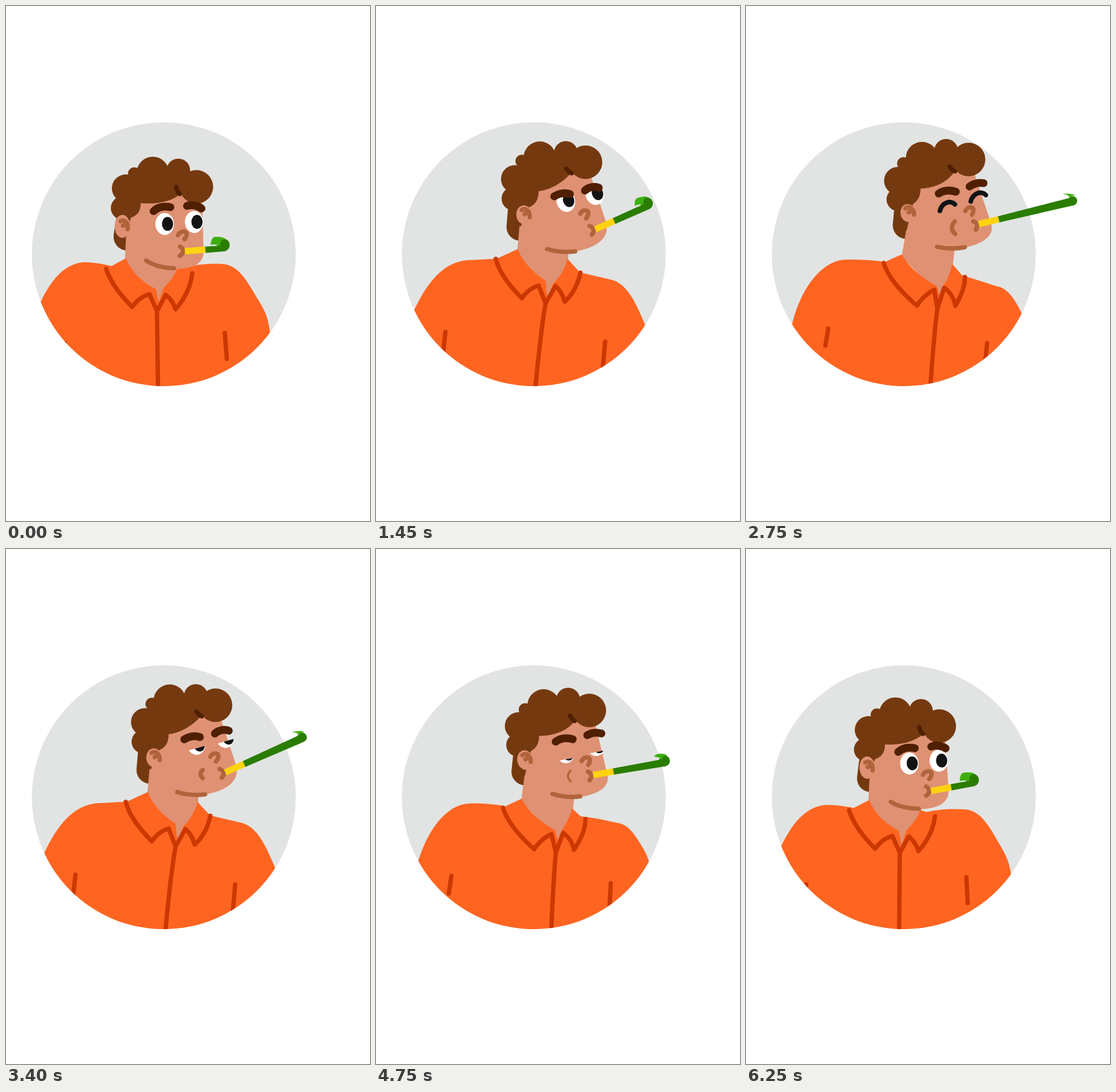
Recreate the animation shown at these times as an HTML page. Size 629 px wide and 890 px high, loop 6300 ms.

```html
<!DOCTYPE html>
<html lang="en">
<head>
<meta charset="utf-8">
<title>Party horn</title>
<style>
  html, body { margin: 0; width: 100%; height: 100%; overflow: hidden; background: #fff; }
  svg { display: block; width: 100vw; height: 100vh; }
  .line { fill: none; stroke-linecap: round; stroke-linejoin: round; stroke-width: 7.5; }
  .skin { fill: #df9173; }
  .hair { fill: #75390f; }
  .nape { stroke: #75390f; stroke-width: 47; }
  .seam { stroke: #cc3800; }
  .crease { stroke: #b0643b; }
  .brow { stroke: #4f1f00; stroke-width: 13.5; }
  .lash { stroke: #121418; stroke-width: 8; }
</style>
</head>
<body>
<svg viewBox="0 0 629 890">
  <defs>
    <clipPath id="disc"><circle cx="272.7" cy="429" r="228"/></clipPath>
    <clipPath id="lid"><rect id="lidRect" x="-30" width="60" height="60"/></clipPath>
    <g id="ball">
      <ellipse rx="16" ry="19" fill="#fff"/>
      <ellipse id="pupil" cx="5" rx="9.7" ry="12" fill="#121414"/>
    </g>
  </defs>
  <circle cx="272.7" cy="429" r="228" fill="#e1e4e3"/>
  <path id="nape" class="line nape"/>
  <path id="neck" class="skin"/>
  <g clip-path="url(#disc)">
    <path id="shirt" fill="#ff6521"/>
    <path id="collar" class="line seam"/>
    <path id="placket" class="line seam"/>
    <path id="sleeves" class="line seam"/>
  </g>
  <path id="face" class="skin"/>
  <path id="hairFill" class="hair"/>
  <g id="curls" class="hair"></g>
  <path id="parting" class="line" stroke="#4f1f00"/>
  <g id="ear">
    <ellipse id="lobe" class="skin" rx="13.5"/>
    <path class="line crease" d="M-3-9C5-13 11-4 9 5M1-1L6-3"/>
  </g>
  <g id="eyeL"></g>
  <g id="eyeR"></g>
  <path id="brows" class="line brow"/>
  <path id="nose" class="line crease"/>
  <path id="mouth" class="line crease"/>
  <path id="cheek" class="line crease"/>
  <path id="jaw" class="line crease"/>
  <g id="horn">
    <path id="paper" fill="#2a7d00"/>
    <circle id="roll" fill="#2a7d00"/>
    <path id="flap" fill="#3fae10"/>
    <rect y="-5.5" width="35.5" height="11" fill="#ffd310"/>
  </g>
</svg>
<script>
const $ = id => document.getElementById(id);

// Each part in four poses: rest, leaning, blowing, easing back.
const paths = {
  nape: [
    "M207 400L210 378",
    "M297 373L300 340",
    "M277 379L280 346",
    "M249 382L252 346"],
  neck: [
    "M205 400L203 445L262 514L289 480L296 455L300 420Z",
    "M297 385L288 430L355 497L372 474L375 445L380 400Z",
    "M284 385L277 428L341 499L358 474L363 442L365 405Z",
    "M248 380L244 425L296 506L324 474L332 438L333 410Z"],
  shirt: [
    "M40 700L40 560C62 495 90 443 137 443C155 444 168 447 181 450L205 437C216 464 237 480 257 490L262 513L270 488C283 475 290 464 294 455L302 453C330 444 352 444 370 444C402 444 417 478 440 515C453 538 456 555 456 590L456 700Z",
    "M86 700L86 580C86 520 130 438 183 437C210 436 235 437 257 440L288 427C302 452 330 471 350 482L355 496L362 482C368 468 373 455 374 443L394 469C415 480 435 489 453 496C465 500 475 512 480 522C490 540 495 560 495 600L495 700Z",
    "M76 700L76 580C80 520 122 438 175 438C200 437 222 437 244 439L277 424C290 450 317 467 335 479L340 498L350 480C356 466 361 453 362 441L385 466C410 478 432 486 446 493C460 499 470 517 476 531C484 550 490 570 490 600L490 700Z",
    "M40 700L40 590C72 500 105 439 165 439C185 438 195 437 208 437L245 420C255 446 276 463 293 475L296 505L306 480C320 466 328 450 331 437L352 460C375 466 395 470 410 474C435 482 450 515 465 551C470 565 475 590 475 610L475 700Z"],
  collar: [
    "M171 455C180 483 200 505 216 521C225 508 235 502 246 499L259 528L274 500C283 507 288 515 291 525C308 505 318 485 320 462",
    "M257 441C266 470 295 498 318 517C327 503 337 494 348 488L351 522L362 483C372 490 380 503 382 516C390 500 396 485 395 470",
    "M244 439C254 466 280 495 300 513C309 500 318 491 330 485L335 518L350 482C358 489 365 501 367 514C377 500 384 485 384 467",
    "M207 437C213 462 235 488 252 505C260 494 270 486 281 483L293 514L310 484C318 490 323 500 326 511C340 498 349 482 353 461"],
  placket: [
    "M259 528C260 570 261 615 262 665",
    "M351 522C343 570 339 615 334 665",
    "M335 518C326 570 321 615 315 665",
    "M293 514C285 560 280 610 275 665"],
  sleeves: [
    "M377 564L381 609M100 584L96 618",
    "M428 588L421 630M154 550L149 578",
    "M418 586L411 628M144 553L139 582",
    "M396 580L392 625M120 563L116 600"],
  face: [
    "M222 330L206 395L205 437C230 448 262 457 293 456C325 455 339 445 338 425L337 325L280 310Z",
    "M315 315L297 390L288 428C320 415 370 412 405 406C440 396 455 380 448 362L408 270L360 275Z",
    "M300 315L283 390L277 425C305 415 355 412 390 406C425 396 444 378 436 358L386 265L340 275Z",
    "M270 325L249 385L245 420C270 422 310 427 345 424C380 418 404 402 398 375L370 290L320 290Z"],
  parting: [
    "M292 315C293 321 295 325 298 327",
    "M369 267C372 270 375 273 379 274",
    "M349 266C352 269 355 271 359 272",
    "M329 281C332 285 334 288 338 289"],
  brows: [
    "M252 356C260 348 270 347 281 349M310 347C320 344 328 347 335 352",
    "M356 315C365 310 375 309 386 313M408 302C414 296 423 293 432 293",
    "M341 313C350 309 361 308 371 311M393 300C399 292 408 289 416 289",
    "M308 329C316 324 326 322 335 325M361 319C367 313 377 311 385 314"],
  nose: [
    "M294 398C298 390 309 390 309 396C309 401 307 403 305 405",
    "M403 342C407 333 417 334 417 340C417 344 416 346 415 348",
    "M390 339C394 330 403 330 404 336C404 340 403 342 402 344",
    "M353 359C357 351 367 352 367 358C367 363 365 365 363 367"],
  mouth: [
    "M297 418C303 421 304 430 296 434",
    "M420 359C427 361 429 366 426 373",
    "M410 353C417 354 421 359 418 366",
    "M369 380C377 383 378 390 373 395"],
  cheek: [
    "M272 412C267 415 267 418 272 421",
    "M386 361C378 370 380 380 387 386",
    "M371 356C364 366 367 379 374 386",
    "M340 382C335 386 335 392 340 396"],
  jaw: [
    "M239 441C252 451 270 454 287 455",
    "M356 409C375 411 392 410 404 406",
    "M342 411C360 412 375 410 390 406",
    "M296 420C312 425 328 426 344 424"],
  // curl centres, then the hairline from parting to sideburn
  hairFill: [
    "M199 350L205 316L220 291L252 290L296 286L327 315L298 328C285 338 262 345 230 342C230 360 220 366 203 370Z",
    "M281 330L279 298L287 267L319 255L360 240L401 251L377 276C365 295 345 306 322 308C322 325 315 335 300 340Z",
    "M261 335L260 302L267 270L296 257L339 241L379 248L357 273C345 295 325 307 307 310C308 327 300 336 286 342Z",
    "M237 333L240 299L252 268L283 262L328 254L362 270L336 290C322 305 302 318 281 320C281 340 272 346 254 352Z"]
};
const spots = {
  ear: ["198 382 0 20", "304 351 -18 14.5", "291 353 -20 15", "256 361 -8 16.5"],
  eyeL: ["271 379 0", "370 330 -20", "357 328 -22", "328 337 -16"],
  eyeR: ["322 376 0", "424 310 -20", "408 306 -22", "378 325 -16"],
  horn: ["305 426 0", "430 363 -17.5", "421 356 -32.5", "379 386 -24"],
  // loose sliver and full curl, measured from the horn's tip
  flap: [
    "M-22 -17C-18 -16 -12 -15 -8 -13C-5 -12 -3 -11 -1 -8C-5 -10 -9 -10 -10 -7L-12 -8C-12 -12 -17 -15 -22 -17Z",
    "M-33 -8C-31 -16 -29 -22 -22 -21C-16 -20 -10 -20 -5 -15C-12 -17 -17 -12 -16 -6L-20 -5C-22 -8 -27 -8 -33 -8Z"]
};
const curlR = [20, 24, 11, 28, 20.5, 29];

const number = /-?\d+(\.\d+)?/g;
const parsed = {};
for (const group of [paths, spots])
  for (const key in group)
    parsed[key] = group[key].map(s => s.match(number).map(Number));

const blend = (key, w) => parsed[key][0].map((_, i) =>
  parsed[key].reduce((sum, pose, p) => sum + pose[i] * w[p], 0));

function fill(template, values) {
  let i = 0;
  return template.replace(number, () => values[i++].toFixed(2));
}

function set(id, attrs) {
  const el = $(id);
  for (const name in attrs) el.setAttribute(name, attrs[name]);
}

$("curls").innerHTML = curlR.map((r, i) => `<circle id="curl${i}" r="${r}"/>`).join("");
for (const id of ["eyeL", "eyeR"]) {
  $(id).innerHTML = `<g id="${id}Open"><g clip-path="url(#lid)"><use href="#ball"/></g></g>
    <path id="${id}Shut" class="line lash" d="M-13 13C-9-2 6-6 13 2"/>`;
}

const clamp = x => Math.max(0, Math.min(1, x));
const smooth = x => x * x * (3 - 2 * x);

const REST = [1, 0, 0, 0], LEAN = [0, 1, 0, 0], PEAK = [0, 0, 1.35, -.35], BACK = [0, 0, 0, 1];
const moves = [
  [250, 850, REST, LEAN, x => .7 * smooth(x) + .3 * Math.sin(x * Math.PI / 2)],
  [850, 1000, LEAN, PEAK, x => 1 - (1 - x) ** 2],
  [1000, 1300, PEAK, BACK, smooth],
  [1800, 2150, BACK, REST, smooth]
];
function weights(t) {
  let w = REST;
  for (const [from, to, a, b, ease] of moves) {
    if (t < from) break;
    const s = ease(clamp((t - from) / (to - from)));
    w = a.map((v, i) => v + (b[i] - v) * s);
  }
  return w;
}

// Tracks of [time, value] with straight lines between.
const tracks = {
  reach: [[300, 41], [500, 80], [650, 140], [850, 168], [1000, 205], [1100, 184], [1150, 161],
    [1300, 119], [1450, 75], [1650, 60], [1800, 57], [2050, 50], [2100, 43], [2150, 41]],
  curl: [[350, 1], [500, .85], [650, .5], [850, .35], [950, 0], [1100, 0], [1300, .55], [1480, 1]],
  lift: [[1800, 0], [2050, 5.5], [2150, 0]],
  lid: [[350, 0], [600, 1], [1200, 1], [1300, .68], [1450, 0]],
  puff: [[480, 0], [620, 1], [1320, 1], [1420, 0]]
};
function track(name, t) {
  const keys = tracks[name], n = keys.findIndex(k => k[0] >= t);
  if (n < 0) return keys[keys.length - 1][1];
  if (n === 0) return keys[0][1];
  const [t0, v0] = keys[n - 1], [t1, v1] = keys[n];
  return v0 + (v1 - v0) * (t - t0) / (t1 - t0);
}

function drawHorn(t, w) {
  const [x, y, turn] = blend("horn", w);
  const curl = track("curl", t), reach = track("reach", t), end = 35 + reach;
  const half = 5 + 2 * clamp((reach - 41) / 80);
  const r = Math.max(half, 5 + 6 * curl), cx = end - r;
  const flare = 1.5 * clamp(1 - curl * 6);
  const stop = flare ? end : cx, neck = stop - 12 * clamp(flare);
  set("horn", { transform: `translate(${x} ${y}) rotate(${turn - track("lift", t)})` });
  set("roll", { cx, cy: half - r, r: flare ? 0 : r });
  set("paper", { d: `M35-5.5L${neck} ${-half}L${stop} ${-half - flare}L${stop} ${half + flare}L${neck} ${half}L35 5.5Z` });

  const thick = clamp((curl - .55) / .45);
  set("flap", {
    d: fill(spots.flap[0], blend("flap", [1 - thick, thick])),
    transform: `translate(${end} 0) scale(${clamp(curl / .3)})`
  });
}

function draw(ms) {
  let t = Math.floor(ms / 50) * 50 % 2100;
  if (t < 50) t += 2100;
  const w = weights(t);

  for (const key in paths) set(key, { d: fill(paths[key][0], blend(key, w)) });
  const hair = blend("hairFill", w);
  curlR.forEach((_, n) => set("curl" + n, { cx: hair[2 * n], cy: hair[2 * n + 1] }));

  const [ex, ey, tilt, ry] = blend("ear", w);
  set("ear", { transform: `translate(${ex} ${ey}) rotate(${tilt})` });
  set("lobe", { ry });

  const lid = track("lid", t), shut = lid >= 1;
  set("lidRect", { y: -20 + 40 * lid });
  set("pupil", { cy: 4 * lid });
  for (const id of ["eyeL", "eyeR"]) {
    const [x, y, turn] = blend(id, w);
    set(id, { transform: `translate(${x} ${y})` });
    set(id + "Open", { transform: `rotate(${turn})`, visibility: shut ? "hidden" : "visible" });
    set(id + "Shut", { visibility: shut ? "visible" : "hidden" });
  }

  $("cheek").style.strokeWidth = 7.5 * track("puff", t);
  drawHorn(t, w);
}

const start = performance.now();
function frame() {
  draw((performance.now() - start) % 6300);
  requestAnimationFrame(frame);
}
frame();
</script>
</body>
</html>
```
